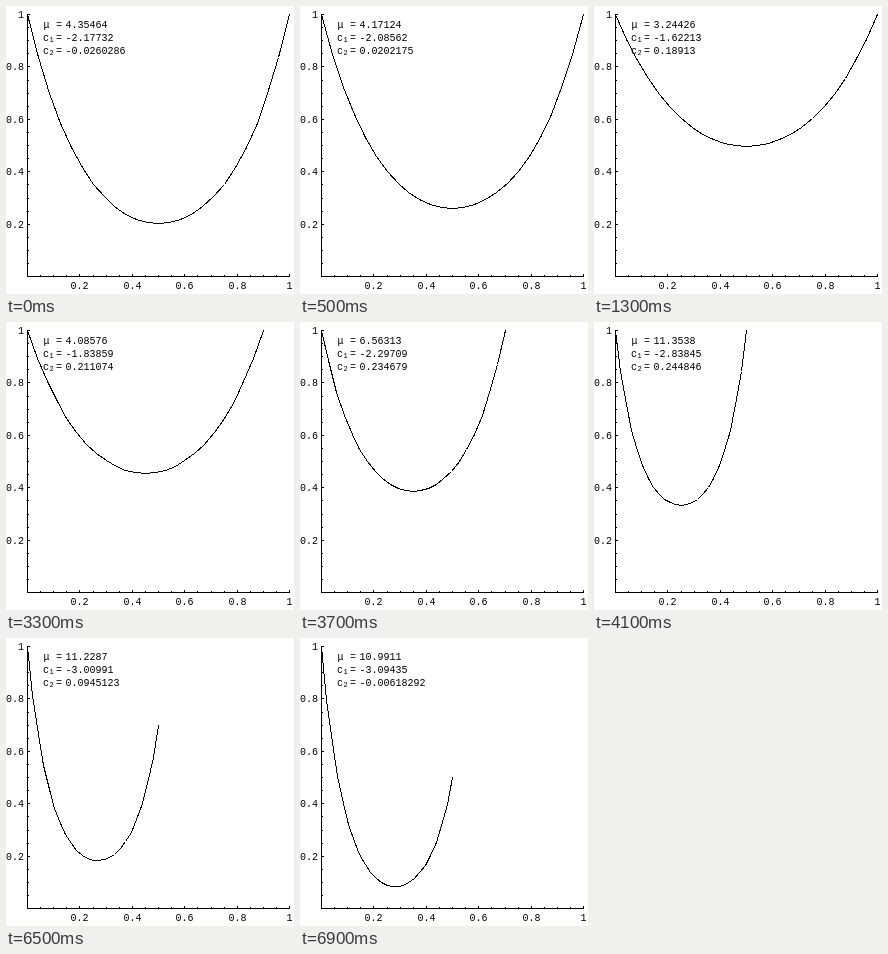
Animation of 288x288 px, one loop 8 s. Source, as an HTML page:

```html
<!DOCTYPE html>
<html lang="en">
<head>
<meta charset="utf-8">
<title>Hanging chain</title>
<style>
  html, body { margin: 0; width: 100%; height: 100%; overflow: hidden; background: #fff; }
  svg { display: block; width: 100%; height: 100%; }
  path { fill: none; stroke: #000; stroke-width: 1; shape-rendering: crispEdges; }
  text { font: 10px "Liberation Mono", "Courier New", monospace; fill: #000; white-space: pre; }
  .sub { font-size: 7px; }
</style>
</head>
<body>
<svg viewBox="0 0 288 288">
  <path id="axes"/>
  <path id="curve"/>
  <g id="labels"></g>
  <text x="37.5" y="22" font-style="italic">μ</text>
  <text x="37" y="35">c<tspan class="sub" x="43.5" y="36">1</tspan></text>
  <text x="37" y="48">c<tspan class="sub" x="43.5" y="49">2</tspan></text>
  <text x="50" y="22">=</text>
  <text x="50" y="35">=</text>
  <text x="50" y="48">=</text>
  <text class="value" x="59.5" y="22"></text>
  <text class="value" x="59.5" y="35"></text>
  <text class="value" x="59.5" y="48"></text>
</svg>
<script>
const LOOP = 8000, SCALE = 262.3, SEGMENTS = 24;
// Both snap to pixel centres
const px = x => Math.floor(21.5 + SCALE * x) + .5;
const py = y => Math.floor(270.8 - SCALE * y) + .5;
const byId = id => document.getElementById(id);
const values = document.querySelectorAll('.value');

function drawAxes() {
  let d = 'M21.5 8V271M21 270.5H284';
  for (let i = 1; i <= 20; i++) {
    const major = i % 4 === 0, size = major ? 2 : 1;
    const x = px(i / 20), y = py(i / 20);
    d += `M${x} 270v${-size}M22 ${y}h${size}`;
    if (major) {
      addLabel(i / 20, x, 283, 'middle');
      addLabel(i / 20, 18, y + 3.5, 'end');
    }
  }
  byId('axes').setAttribute('d', d);
}

function addLabel(value, x, y, anchor) {
  const label = document.createElementNS('http://www.w3.org/2000/svg', 'text');
  label.setAttribute('x', x);
  label.setAttribute('y', y);
  label.setAttribute('text-anchor', anchor);
  label.textContent = value;
  byId('labels').append(label);
}

// Catenary y = cosh(mu x + c1) / mu + c2 from (0, 1) to (width, end) with a given length
function solve(length, width, end) {
  const drop = end - 1, span = Math.sqrt(length ** 2 - drop ** 2);
  let low = .01, high = 40;
  for (let i = 0; i < 60; i++) {
    const mid = (low + high) / 2;
    if (2 * Math.sinh(mid * width / 2) / mid < span) low = mid; else high = mid;
  }
  const mu = (low + high) / 2;
  const c1 = Math.atanh(drop / length) - mu * width / 2;
  return [mu, c1, 1 - Math.cosh(c1) / mu];
}

// Five steps of 200 ms, the first one at the start time
const steps = (t, start) => Math.max(0, Math.min(5, Math.floor((t - start) / 200) + 1));

let shown = '';
function draw(t) {
  const length = 2 - steps(t, 500) / 10;
  const width = 1 - steps(t, 3300) / 10;
  const end = 1 - steps(t, 6100) / 10;
  const pose = [length, width, end].join();
  if (pose === shown) return;
  shown = pose;

  const [mu, c1, c2] = solve(length, width, end);
  const points = Array.from({ length: SEGMENTS + 1 }, (_, i) => {
    const x = width * i / SEGMENTS;
    return `${px(x)} ${py(Math.cosh(mu * x + c1) / mu + c2)}`;
  });
  byId('curve').setAttribute('d', 'M' + points.join('L'));
  [mu, c1, c2].forEach((v, i) => values[i].textContent = Number(v.toPrecision(6)));
}

drawAxes();
const origin = performance.now();
function tick() {
  draw((performance.now() - origin) % LOOP);
  requestAnimationFrame(tick);
}
tick();
</script>
</body>
</html>
```
